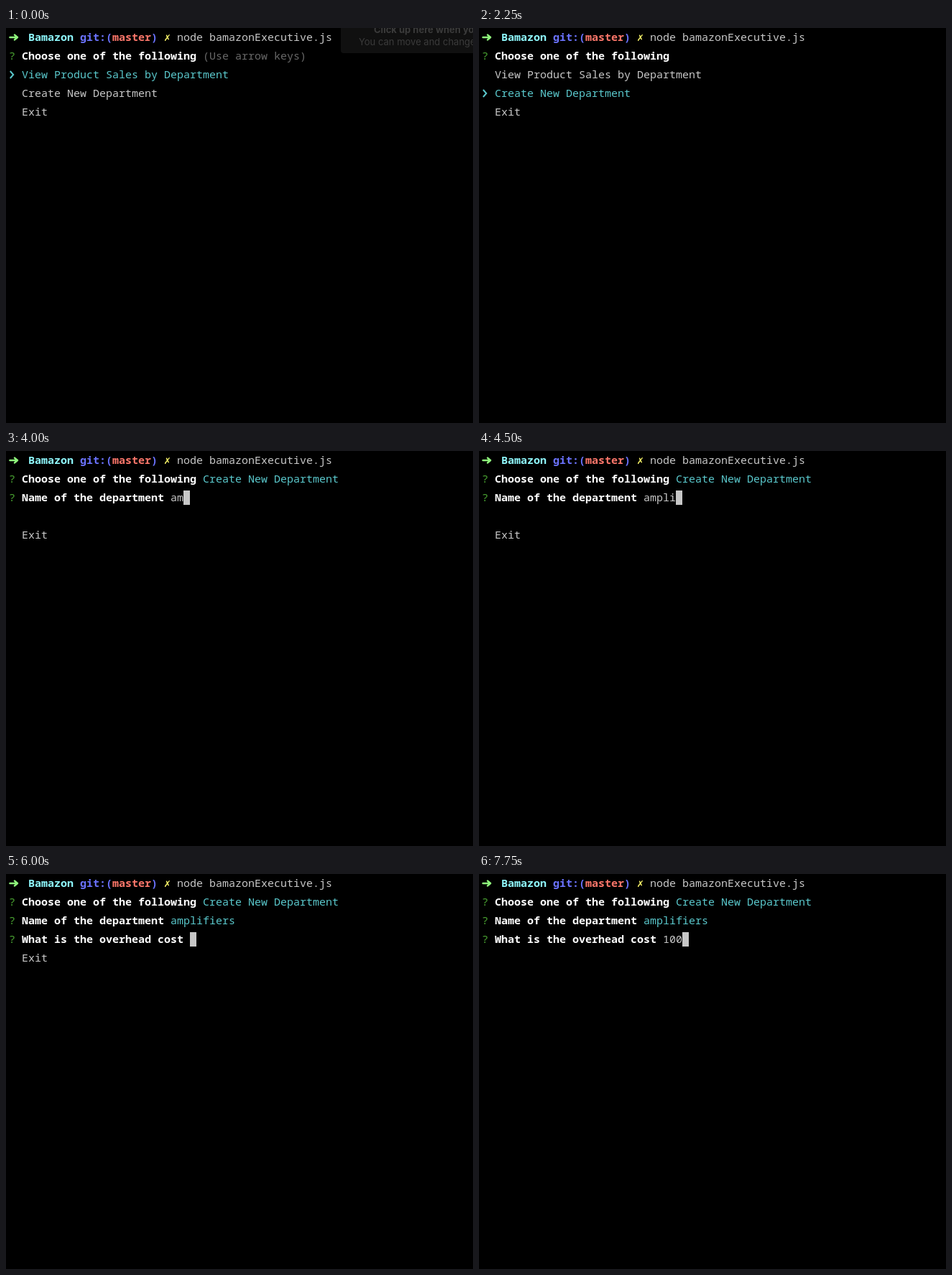
An HTML page that plays this animation: 650x550 px, repeating every 8000 ms.

```html
<!DOCTYPE html>
<html lang="en">
<head>
<meta charset="utf-8">
<title>Terminal prompt</title>
<style>
  html, body { margin: 0; width: 100%; height: 100%; overflow: hidden; background: #000; }
  svg { display: block; width: 650px; height: 550px; }
  text { white-space: pre; }
  #term, #screen { font: 15px "Roboto Mono", "Noto Sans Mono", "Liberation Mono", monospace; }
  #notice { font: 13px Inter, Roboto, sans-serif; fill: #3b3b3b; }
  .b { font-weight: 700; }
  .plain { fill: #c7c7c7; }
  .white { fill: #fff; font-weight: 700; }
  .dim { fill: #686868; }
  .cyan { fill: #5ac8cc; }
  .green { fill: #4aa532; }
  .dir { fill: #8ffaff; font-weight: 700; }
  .git { fill: #6b73ff; font-weight: 700; }
  .branch { fill: #ff776b; font-weight: 700; }
  .mark { fill: #fffb6b; font-family: "DejaVu Sans Mono", "DejaVu Sans", monospace; font-weight: 700; }
  .arrow { fill: none; stroke: #8ff67c; stroke-width: 2.5; stroke-linecap: round; stroke-linejoin: round; }
  .pointer { fill: none; stroke: #5ac8cc; stroke-width: 2; }
</style>
</head>
<body>
<svg viewBox="0 0 650 550">
  <rect width="650" height="550" fill="#000"/>
  <g id="notice">
    <rect x="466" y="-10" width="200" height="45" rx="4" fill="#101010"/>
    <text class="b" x="512" y="7">Click up here when you</text>
    <text x="491" y="24">You can move and change</text>
  </g>
  <path class="arrow" d="M5.5 13H15M12 9.6L16 13L12 16.4"/>
  <g id="term"></g>
  <g id="screen"></g>
</svg>
<script>
  const LOOP = 8000, CELL = 9, ROW = 26, LEFT = 4;
  const $ = id => document.getElementById(id);
  const colX = col => LEFT + col * CELL;

  const run = (row, col, cls, str) =>
    `<text class="${cls}" x="${colX(col)}" y="${18 + row * ROW}">${str}</text>`;
  const cursor = (row, col) =>
    `<rect class="plain" x="${colX(col)}" y="${3 + row * ROW}" width="${CELL}" height="20"/>`;
  const pointer = row =>
    `<path class="pointer" d="M5.8 ${8 + row * ROW}L10.2 ${13 + row * ROW}L5.8 ${18 + row * ROW}"/>`;

  const CHOOSE = "Choose one of the following";
  const NAME = "Name of the department";
  const COST = "What is the overhead cost";
  const ITEMS = ["View Product Sales by Department", "Create New Department", "Exit"];

  const question = (row, str) => run(row, 0, "green", "?") + run(row, 2, "white", str);
  const answered = (row, str, answer) =>
    question(row, str) + run(row, str.length + 3, "cyan", answer);
  const asking = (row, str, typed) => {
    const col = str.length + 3;
    return question(row, str) + run(row, col, "plain", typed) + cursor(row, col + typed.length);
  };
  const exitLine = run(4, 2, "plain", ITEMS[2]);

  function menu(selected, hint) {
    return question(1, CHOOSE) + (hint ? run(1, 30, "dim", "(Use arrow keys)") : "") +
      ITEMS.map((item, i) => run(i + 2, 2, i === selected ? "cyan" : "plain", item)).join("") +
      pointer(selected + 2);
  }

  // [start time, characters typed]
  const NAME_KEYS = [[0, 0], [4000, 2], [4250, 3], [4500, 5], [4750, 6], [5000, 8], [5250, 9], [5500, 10]];
  const COST_KEYS = [[0, 0], [7250, 1], [7500, 2], [7750, 3]];
  const typed = (str, keys, t) => str.slice(0, keys.filter(k => k[0] <= t).pop()[1]);

  function screenAt(t) {
    if (t < 2250) return menu(0, true);
    if (t < 2750) return menu(1, false);
    const head = answered(1, CHOOSE, ITEMS[1]);
    if (t < 6000) return head + asking(2, NAME, typed("amplifiers", NAME_KEYS, t)) + exitLine;
    return head + answered(2, NAME, "amplifiers") +
      asking(3, COST, typed("100", COST_KEYS, t)) + (t < 7500 ? exitLine : "");
  }

  $("term").innerHTML =
    run(0, 3, "dir", "Bamazon") + run(0, 11, "git", "git:(") + run(0, 16, "branch", "master") +
    run(0, 22, "git", ")") + run(0, 24, "mark", "✗") + run(0, 26, "plain", "node bamazonExecutive.js");

  let shown = "";
  function draw() {
    const t = performance.now() % LOOP;
    const next = screenAt(t);
    if (next !== shown) $("screen").innerHTML = shown = next;
    $("notice").style.display = t < 250 ? "" : "none";
    requestAnimationFrame(draw);
  }
  draw();
</script>
</body>
</html>
```
